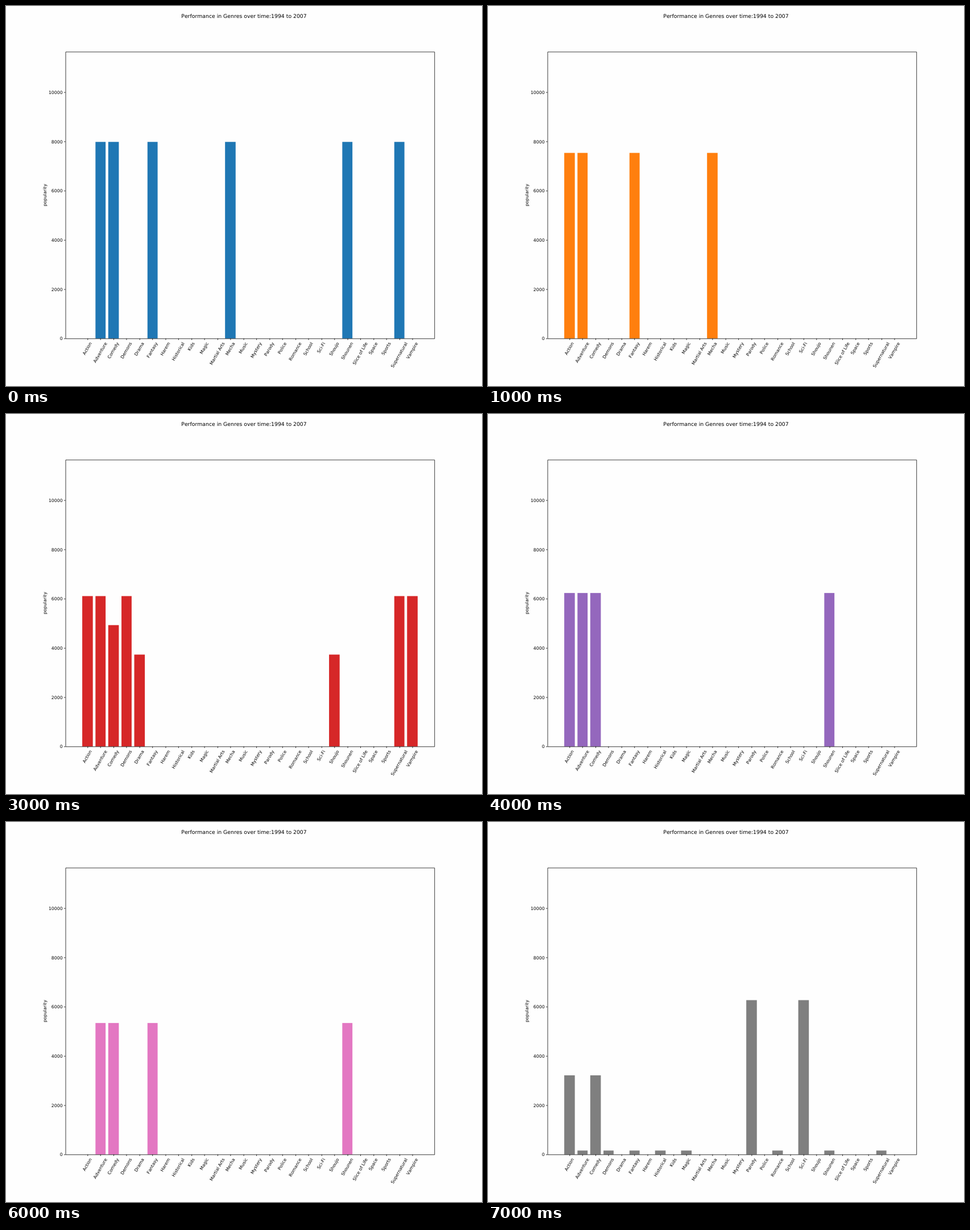
These frames come from a looping animation (837x669 px, 8000 ms). An HTML page:

```html
<!DOCTYPE html>
<html lang="en">
<head>
<meta charset="utf-8">
<title>Performance in Genres</title>
<style>
  html, body { margin: 0; width: 100%; height: 100%; overflow: hidden; background: #fefefe; }
  svg { display: block; width: 837px; height: 669px; }
  text {
    font: 10px "DejaVu Sans", sans-serif;
    font-kerning: none;
    text-rendering: geometricPrecision;
    text-anchor: middle;
  }
  .title { font-size: 12px; }
  .value { text-anchor: end; }
  .axes { fill: none; stroke: #000; }
</style>
</head>
<body>
<svg id="chart" viewBox="0 0 1080 864" preserveAspectRatio="none"></svg>
<script>
const GENRES = ('Action,Adventure,Comedy,Demons,Drama,Fantasy,Harem,Historical,Kids,Magic,' +
  'Martial Arts,Mecha,Music,Mystery,Parody,Police,Romance,School,Sci-Fi,Shoujo,Shounen,' +
  'Slice of Life,Space,Sports,Supernatural,Vampire').split(',');

// Each step: bar colour, then genres (a = first, z = last) with their popularity
const STEPS = [
  '#1f77b4 bcfluy:7990',
  '#ff7f0e abfl:7540',
  '#2ca02c al:11095 bfj:7828 suw:6430 g:1748 cq:1592 ehkt:1268',
  '#d62728 abdyz:6110 c:4932 et:3735',
  '#9467bd abcu:6237',
  '#8c564b cejmqt:4576',
  '#e377c2 bcfu:5337',
  '#7f7f7f os:6270 ac:3215 bdfhjquy:160'
];
const STEP_MS = 1000;

const LEFT = 135, RIGHT = 972, TOP = 103.68, BASE = 756;
const PITCH = (RIGHT - LEFT) / (1.1 * (GENRES.length - 0.2));
const MAX = 11095 * 1.05;

const svg = document.getElementById('chart');
const snap = v => Math.round(v) + 0.5;
const centre = i => (LEFT + RIGHT) / 2 + (i - (GENRES.length - 1) / 2) * PITCH;
const height = v => (BASE - TOP) * v / MAX;

function add(parent, tag, attrs, text = '') {
  const el = document.createElementNS('http://www.w3.org/2000/svg', tag);
  for (const key in attrs) el.setAttribute(key, attrs[key]);
  el.textContent = text;
  return parent.appendChild(el);
}

const bars = add(svg, 'g', {});
const rects = GENRES.map((_, i) => {
  const x = Math.round(centre(i) - 0.4 * PITCH);
  const width = Math.round(centre(i) + 0.4 * PITCH) - x;
  return add(bars, 'rect', { x, width });
});

function drawAxes() {
  let path = `M${snap(LEFT)} ${snap(TOP)}H${snap(RIGHT)}V${snap(BASE)}H${snap(LEFT)}Z`;

  for (let v = 0; v <= 10000; v += 2000) {
    const y = BASE - height(v);
    path += `M${LEFT} ${snap(y)}h-3.5`;
    add(svg, 'text', { x: 128.5, y: Math.round(y + 3.8), class: 'value' }, v);
  }

  // Slanted labels: the rotated text box is centred below its tick
  const angle = Math.PI / 3, lineHeight = 10;
  GENRES.forEach((name, i) => {
    path += `M${snap(centre(i))} ${BASE}v3.5`;
    const label = add(svg, 'text', { y: 2.7 }, name);
    const w = label.getComputedTextLength();
    const boxHeight = w * Math.sin(angle) + lineHeight * Math.cos(angle);
    label.setAttribute('transform',
      `translate(${centre(i)} ${BASE + 7 + boxHeight / 2}) rotate(-60)`);
  });

  add(svg, 'path', { d: path, class: 'axes' });
  add(svg, 'text', { transform: 'translate(91 430) rotate(-90)' }, 'popularity');
  add(svg, 'text', { x: 540, y: 27, class: 'title' },
    'Performance in Genres over time:1994 to 2007');
}

function render(ms) {
  const step = Math.floor(ms / STEP_MS) % STEPS.length;
  const [color, ...groups] = STEPS[step].split(' ');
  bars.setAttribute('fill', color);
  rects.forEach(r => r.setAttribute('height', 0));
  for (const group of groups) {
    const [keys, value] = group.split(':');
    const y = Math.round(BASE - height(value));
    for (const key of keys) {
      const rect = rects[key.charCodeAt(0) - 97];
      rect.setAttribute('y', y);
      rect.setAttribute('height', BASE - y);
    }
  }
}

drawAxes();
const start = performance.now();
function tick() {
  render(performance.now() - start);
  requestAnimationFrame(tick);
}
tick();
</script>
</body>
</html>
```
